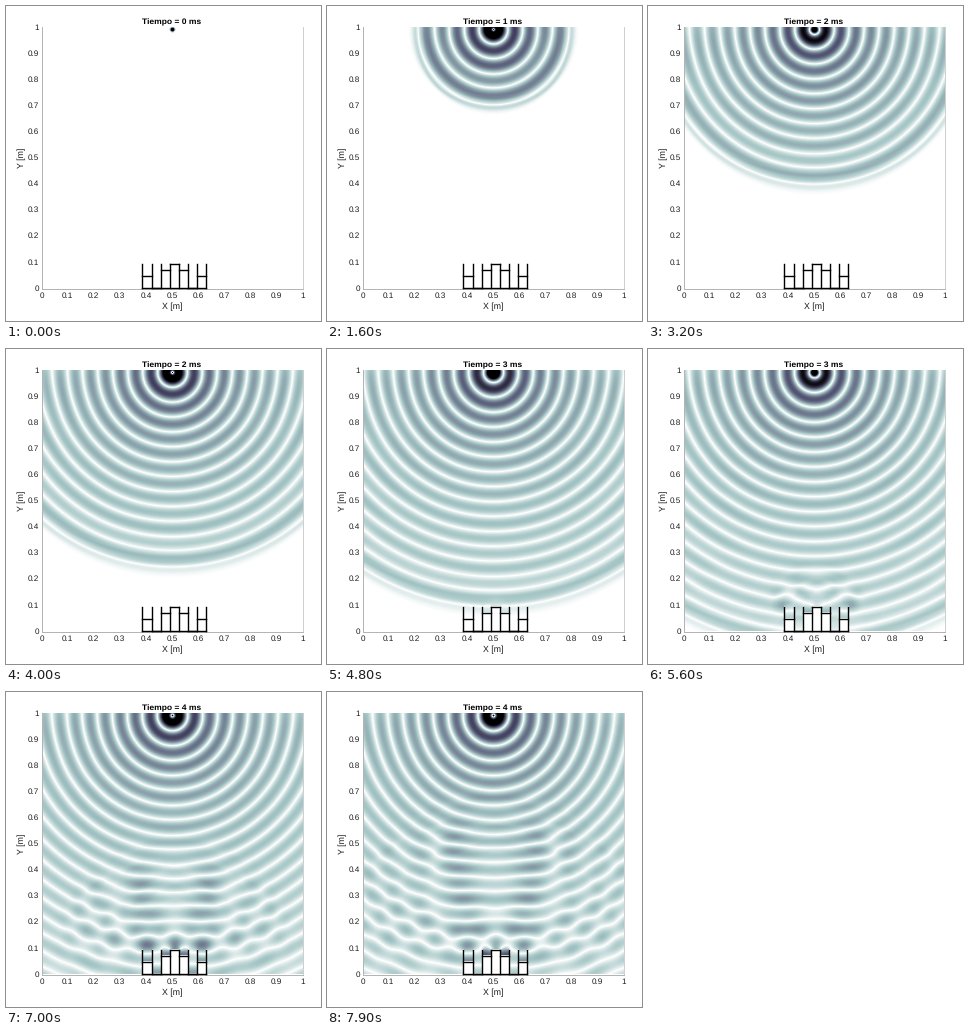
Animation, 315 px wide and 315 px high, one loop 8000 ms. Source, as a matplotlib script:

```python
import numpy as np
import matplotlib.pyplot as plt
from matplotlib.animation import FuncAnimation

SIZE, DPI = 315, 100
FRAMES, INTERVAL = 80, 100
LEFT, TOP, N = 35.5, 21, 261        # plot area: N px per metre

# Acoustics
C = 343.0                           # speed of sound, m/s
FREQ = 3000.0                       # source tone, Hz
FRAME_DT = 0.05575e-3               # simulated seconds per frame
SUB = 8                             # solver steps per frame
LEAD = 5                            # steps already done at the first frame
PAD = 48                            # absorbing border, cells
GAIN, PHASE, RAMP = 7.6, 0.602 * np.pi, 0.03e-3

# Quadratic residue diffuser with 7 wells
WELL_X, WELL_W, HEIGHT, UNIT = 0.385, 0.035, 0.0975, 0.0245
WELLS = [2, 4, 1, 0, 1, 4, 2]

plt.rcParams["font.family"] = "Liberation Sans"
plt.rcParams["text.hinting"] = "none"


def col(x):
    return int(round(x * N))


def row(y):
    return int(round((1 - y) * N))


fins = [col(WELL_X + i * WELL_W) for i in range(len(WELLS) + 1)]
floors = [row(max(HEIGHT - d * UNIT, 0.0)) for d in WELLS]
rim = row(HEIGHT)


def solid_mask():
    solid = np.zeros((N, N), bool)
    for x in fins:
        solid[rim:, x] = True
    for a, b, y in zip(fins, fins[1:], floors):
        solid[min(y, N - 1):, a:b] = True
    return solid


def sponge(n):
    i = np.arange(n)
    depth = np.maximum(0, np.maximum(PAD - i, i - (n - 1 - PAD)))
    fade = np.exp(-(0.006 * depth) ** 2)
    return np.outer(fade, fade)


def simulate():
    n = N + 2 * PAD
    inner = (slice(PAD, PAD + N),) * 2
    h = FRAME_DT / SUB
    k2 = (C * h * N) ** 2
    free = np.ones((n, n))
    free[inner] = ~solid_mask()
    open_x = k2 * free[:, 1:] * free[:, :-1]
    open_y = k2 * free[1:] * free[:-1]
    fade = sponge(n)
    src = (PAD + 2, PAD + N // 2)
    p, old = np.zeros((n, n)), np.zeros((n, n))
    shots = []
    for step in range(1, LEAD + SUB * (FRAMES - 1) + 1):
        t = step * h
        new = 2 * p - old
        fx = (p[:, 1:] - p[:, :-1]) * open_x
        fy = (p[1:] - p[:-1]) * open_y
        new[:, :-1] += fx
        new[:, 1:] -= fx
        new[:-1] += fy
        new[1:] -= fy
        drive = min(1.0, t / RAMP) * np.sin(2 * np.pi * FREQ * t + PHASE)
        new[src] += k2 * GAIN * drive
        old, p = p * fade, new * fade
        if step >= LEAD and (step - LEAD) % SUB == 0:
            shots.append(np.abs(p[inner]).astype(np.float32))
    return shots


shots = simulate()

fig = plt.figure(figsize=(SIZE / DPI, SIZE / DPI), dpi=DPI, facecolor="white")
ax = fig.add_axes([0, 0, 1, 1])
ax.axis("off")


def px(v):
    return v * 72 / DPI


def label(x, y, s, size, ha="center", va="center", **kw):
    return ax.text(x, y, s, fontsize=px(size), ha=ha, va=va,
                   color="#1c1c1c", **kw)


def line(xs, ys, color, width):
    ax.plot(xs, ys, color=color, lw=px(width), solid_capstyle="projecting",
            solid_joinstyle="miter", zorder=3)


field = ax.imshow(shots[0], cmap="bone_r", vmin=0, vmax=1,
                  extent=(LEFT, LEFT + N, TOP + N, TOP),
                  interpolation="bilinear", aspect="auto", zorder=1)
ax.set_xlim(0, SIZE)
ax.set_ylim(SIZE, 0)

# Axes
right, bottom, mid = LEFT + N, TOP + N + 0.5, LEFT + N / 2
line([LEFT] * 2, [TOP, bottom], "#b4b4b4", 1)
line([right] * 2, [TOP, bottom], "#cfcfcf", 1)
line([LEFT, right], [bottom] * 2, "#b4b4b4", 1)
for i in range(11):
    s = f"{i / 10:g}"
    label(LEFT + N * i / 10, 290, s, 8.2)
    label(33.3, TOP + N * (1 - i / 10) + 0.5, s, 8.2, ha="right")
label(mid, 300.7, "X [m]", 8.8)
label(15.5, 151.5, "Y [m]", 8.8, rotation=90)
title = label(mid, 18, "", 8.5, va="baseline", weight="bold")
title.set_color("black")

# Diffuser outline
base = TOP + N
edges = [LEFT + x + 0.5 for x in fins]
for x in edges:
    line([x, x], [TOP + rim + 0.5, base], "black", 1.4)
for a, b, y in zip(edges, edges[1:], floors):
    line([a, b], [TOP + min(y + 0.5, N)] * 2, "black", 1.4)
line([edges[0], edges[-1]], [base] * 2, "black", 1.4)


def update(i):
    field.set_data(shots[i])
    title.set_text(f"Tiempo = {i * FRAME_DT * 1000:.0f} ms")
    return field, title


anim = FuncAnimation(fig, update, frames=FRAMES, interval=INTERVAL,
                     repeat=True, repeat_delay=0, blit=False)
plt.show()
```
